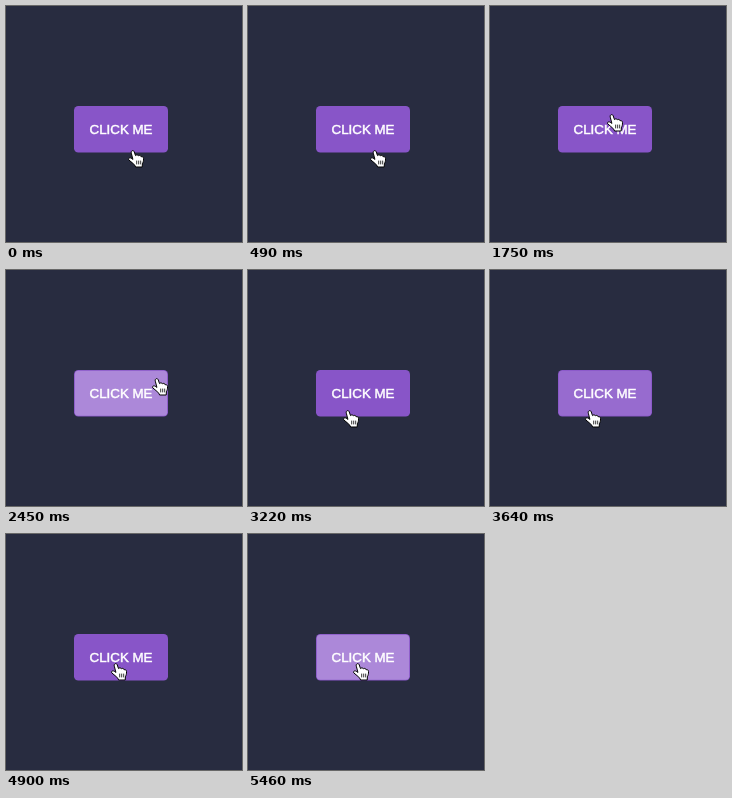
Write an HTML page that moves like this. It is 236 by 236 pixels and loops after 5.53 s.

```html
<!DOCTYPE html>
<html lang="en">
<head>
<meta charset="utf-8">
<title>Ripple button</title>
<style>
  html, body { margin: 0; width: 100%; height: 100%; overflow: hidden; background: #282c40; }
  svg { display: block; width: 100vw; height: 100vh; }
  text { font: 13.333px "Liberation Sans", Arial, sans-serif; fill: #fff; stroke: #fff; stroke-width: .5px; }
</style>
</head>
<body>
<svg viewBox="0 0 236 236">
  <clipPath id="inside"><rect x="68.8" y="100.8" width="92.4" height="45" rx="3.6"/></clipPath>
  <rect x="68" y="100" width="94" height="46.6" rx="4.4" fill="#8855c8"/>
  <text x="115" y="127.8" text-anchor="middle">CLICK ME</text>
  <g clip-path="url(#inside)"><circle id="ripple" fill="#fff"/></g>
  <g id="hand" stroke="#000" stroke-linejoin="round" stroke-linecap="round">
    <path fill="#fff" d="M3.2 2.8C2.6 .6 5.4 -.2 6.2 1.7L7.5 5.6C8 4.6 10 4.6 10.5 5.8C11.2 5 13 5.3 13.2 6.8C14.2 6.2 15.4 7 15.5 8.4C15.7 11 15 12.4 14.4 13.8L14.2 17H7.6L6.9 15.3C5.2 13.8 3 11.4 .9 10C-.2 8.6 1.4 7.2 3.2 8.2L4.6 9.2Z"/>
    <path fill="none" stroke-width=".8" d="M8.7 11v3M10.7 11v3M12.7 11v3"/>
  </g>
</svg>
<script>
  const LOOP = 5530, TICK = 70, RIPPLE = 490, RADIUS = 188;

  // Each press: when, where, and how long the pointer then travels to the next one
  const presses = [
    { at: 0,    x: 122, y: 144, travel: 280 },
    { at: 1070, x: 71,  y: 108, travel: 330 },
    { at: 2171, x: 146, y: 108, travel: 138 },
    { at: 3240, x: 95,  y: 140, travel: 120 },
    { at: 4188, x: 82,  y: 140, travel: 220 },
    { at: 5181, x: 105, y: 129, travel: 0 }
  ];

  const ripple = document.getElementById('ripple');
  const hand = document.getElementById('hand');
  const clamp = k => Math.min(1, Math.max(0, k));
  const ease = k => k * k * (3 - 2 * k);

  function draw(now) {
    const time = Math.floor(now % LOOP / TICK) * TICK;
    const index = presses.findLastIndex(p => p.at <= time);
    const press = presses[index], next = presses[index + 1] || press;
    const age = time - press.at;

    const moved = press.travel ? ease(clamp((age - RIPPLE) / press.travel)) : 0;
    const x = press.x + (next.x - press.x) * moved;
    const y = press.y + (next.y - press.y) * moved;
    hand.setAttribute('transform', `translate(${x} ${y})`);

    const grown = clamp(age / RIPPLE);
    ripple.setAttribute('cx', press.x + 3);
    ripple.setAttribute('cy', press.y + 1.5);
    ripple.setAttribute('r', RADIUS * grown);
    ripple.setAttribute('opacity', 0.7 * (1 - grown));
  }

  const start = performance.now();
  function frame() {
    draw(performance.now() - start);
    requestAnimationFrame(frame);
  }
  frame();
</script>
</body>
</html>
```
